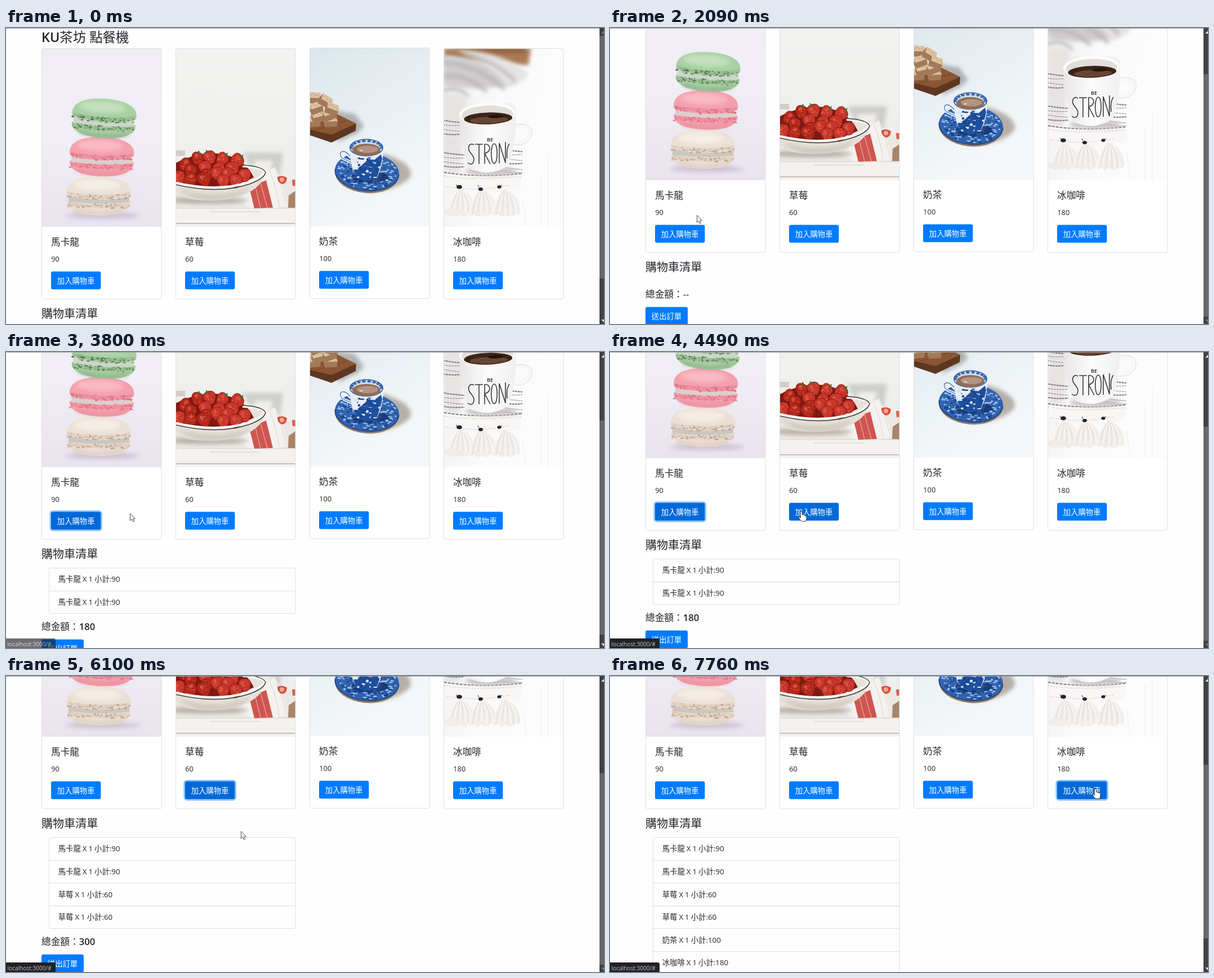
An HTML page that plays this animation: 1062 px wide and 527 px high, repeating every 8 s.

```html
<!DOCTYPE html>
<html lang="zh-Hant">
<head>
<meta charset="utf-8">
<title>點餐機</title>
<style>
html, body { margin: 0; width: 100%; height: 100%; overflow: hidden; background: #fefefe; }
svg { display: block; }
text { font: 13.37px "Open Sans", "Noto Sans CJK TC", "Noto Sans CJK JP", sans-serif; fill: #212529; white-space: pre; }
.h3 { font-size: 23.4px; }
.h4 { font-size: 20.06px; }
.h5 { font-size: 16.7px; }
.num { font-size: 12.8px; }
.row { word-spacing: -.5px; }
.b { font-weight: 600; }
.btn text { fill: #fff; }
.btn rect { fill: #007bff; }
.btn .ring { fill: none; stroke: #268fff; stroke-opacity: .5; stroke-width: 2.7; display: none; }
.btn.dark .face { fill: #0069d9; }
.btn.focus .ring { display: inline; }
.line { fill: none; stroke: #dfdfdf; }
.soft { filter: url(#soft); }
</style>
</head>
<body>
<svg id="stage" width="1062" height="527" viewBox="0 0 1062 527"></svg>
<script>
const LOOP = 8000, VIEW = 527, ROW = 40.6, EMPTY_MAX = 83;
const goods = [
  { name: '馬卡龍', price: 90, x: 63, dy: 0, art: macarons },
  { name: '草莓', price: 60, x: 301, dy: 0, art: berries },
  { name: '奶茶', price: 100, x: 539, dy: -1, art: tea },
  { name: '冰咖啡', price: 180, x: 777, dy: 0, art: coffee }
];

// Runs of screen updates: first, last, count
const runs = [
  [450, 1200, 12], [1400, 1610, 4], [1810, 2580, 12], [2630, 2630, 1], [3120, 3120, 1],
  [3310, 3870, 9], [3940, 4550, 10], [4880, 5430, 8], [5970, 6100, 3], [6180, 6740, 9],
  [6870, 7620, 11], [7690, 7760, 2]
];
const clicks = [[2630, 0], [3120, 0], [4880, 1], [5190, 1], [6740, 2], [7690, 3]];
const scrollKeys = [
  [1330, 0], [1400, 1], [1470, 28], [1540, 68], [1610, 83], [3590, 83], [3660, 86], [3730, 114],
  [3800, 149], [3870, 165], [5900, 165], [5970, 172], [6040, 212], [6100, 246]
];
const pointerKeys = [
  [380, 1080, 560], [450, 1024, 512], [700, 640, 230], [950, 260, 84], [1060, 176, 92], [1200, 247, 107],
  [1740, 247, 107], [1810, 244, 125], [2090, 154, 333], [2300, 130, 358], [2580, 134, 362],
  [3240, 134, 362], [3590, 172, 328], [3800, 220, 287], [3870, 234, 287], [4200, 300, 290], [4550, 349, 282],
  [5900, 349, 282], [6100, 417, 276], [6180, 448, 262], [6600, 590, 212], [6740, 602, 204],
  [6800, 602, 204], [7400, 826, 205], [7620, 862, 201]
];
const statusKeys = [
  [2230, 0], [2370, 1], [3660, 1], [3800, .65], [3940, 0], [4330, 0], [4400, 1],
  [6870, 1], [7020, .6], [7170, 0], [7320, 0], [7400, 1]
];

let seed = 7;
const rnd = (a, b) => {
  seed = (seed * 16807) % 2147483647;
  return +(a + (b - a) * seed / 2147483647).toFixed(1);
};
const many = (n, f) => Array.from({ length: n }, (_, i) => f(i)).join('');
const path = (d, fill, more = '') => `<path d="${d}" fill="${fill}" ${more}/>`;
const stroke = (d, color, w = 1, more = '') => path(d, 'none', `stroke="${color}" stroke-width="${w}" ${more}`);
const oval = (x, y, rx, ry, fill, more = '') => `<ellipse cx="${x}" cy="${y}" rx="${rx}" ry="${ry}" fill="${fill}" ${more}/>`;
const box = (x, y, w, h, fill, more = '') => `<rect x="${x}" y="${y}" width="${w}" height="${h}" fill="${fill}" ${more}/>`;
const label = (x, y, s, cls = '') => `<text x="${x}" y="${y}" class="${cls}">${s}</text>`;
const grad = (id, stops, x2, y2) => `<linearGradient id="${id}" x2="${x2}" y2="${y2}">` +
  stops.map((c, i) => `<stop offset="${i / (stops.length - 1)}" stop-color="${c}"/>`).join('') + '</linearGradient>';

function macaron(x, y, turn, [light, main, frill, spot, cream]) {
  const crumbs = (top, lift) => many(75, () => {
    const px = rnd(-56, 56);
    return oval(px, (top - px * px / 700 * lift + rnd(0, 9)).toFixed(1), rnd(.8, 3), rnd(.6, 1.6), rnd(0, 1) < .5 ? frill : spot, 'opacity=".8"');
  });
  return `<g transform="translate(${x} ${y}) rotate(${turn})">` +
    path('M-56 9Q0 15 57 8C59 25 38 35 0 35S-59 25-56 9', main) +
    stroke('M-44 26Q0 38 44 25', spot, 5, 'class="soft" opacity=".35"') +
    path('M-54 1Q0 8 54 0L54 10Q0 17-54 11z', cream) +
    path('M-57-3C-60-24-38-35 0-35S60-24 57-4Q52 5 0 7Q-52 5-57-3', main) +
    oval(-4, -20, 42, 10, light, 'class="soft"') +
    stroke('M-55-4Q0 7 55-5M-54 15Q0 22 54 14', frill, 6, 'opacity=".45"') +
    crumbs(-2, .7) + crumbs(13, .2) + '</g>';
}
function macarons() {
  return box(0, 0, 212, 318, 'url(#lilac)') +
    oval(108, 298, 66, 6, '#cfc5d6', 'class="soft"') +
    macaron(101, 263, 1, ['#f5eee7', '#ebe0d6', '#d8c3b0', '#b99f89', '#cbc7c0']) +
    macaron(106, 193, 2, ['#fabac4', '#f3a0ad', '#e98092', '#d66d7d', '#dccfcb']) +
    macaron(110, 125, 4, ['#c4e1be', '#a9d0a4', '#86ad7f', '#4f6747', '#cdd6c9']);
}

function berry(x, y) {
  const r = rnd(12, 14);
  return `<g transform="translate(${x} ${y}) rotate(${rnd(-60, 60)})">` +
    path(`M0 ${r}C${-r * .9} ${r * .7} ${-r * 1.4} ${-r} 0 ${-r * .9}S${r * .9} ${r * .7} 0 ${r}`, rnd(0, 1) < .5 ? '#b5271b' : '#c8352a', 'stroke="#7d150f" stroke-width=".8"') +
    oval(-3, -4, 3, 4, '#e2604c', 'opacity=".6"') +
    many(8, () => oval(rnd(-7, 7), rnd(-6, 8), .6, .8, '#e39a78')) +
    (y < 205 ? path(`M-6 ${-r * .8}l4-1 1-4 3 4 5 1-5 2z`, '#55632f') : '') + '</g>';
}
function berries() {
  const spots = [38, 196, 60, 194, 82, 197, 108, 200, 16, 207, 26, 218, 52, 212, 77, 214, 100, 214, 5, 230,
    122, 226, 55, 226, 73, 223, 92, 224, 25, 233, 84, 236, 50, 233, 106, 236];
  return box(0, 0, 212, 318, 'url(#wall)') +
    path('M118 186h72l-6 44h-18l6-30h-34v20z', '#cdcdcc', 'class="soft"') +
    path('M0 182h16v10H0z', '#d3cdc8') +
    box(0, 236, 212, 82, '#ebe7e3') + box(0, 284, 212, 34, '#f4f2f0') +
    stroke('M0 285h212M60 291h90', '#d2cbc5', 1.2) + stroke('M0 312h212', '#b9aea5', 1.4) +
    path('M200 262l12-8v30h-13z', '#a98469') +
    path('M94 264L176 211Q190 240 198 280Q170 288 132 284z', '#f4f2f0') +
    path('M130 248L160 235L172 284L139 285z', '#cf5550') +
    stroke('M140 244L150 284M150 240L162 284', '#e8a19b', 1.3) +
    stroke('M176 213Q188 245 196 279M166 218Q180 250 183 283', '#dad5d1') +
    oval(56, 271, 72, 6, '#94877d', 'class="soft" opacity=".6"') +
    path('M-14 226Q70 232 112 208Q150 208 158 222C154 250 116 271 62 271S4 260-14 240z', '#e6e1da') +
    path('M4 250Q70 272 132 248C116 266 90 271 62 271S20 264 4 250', '#cfc8c0', 'class="soft"') +
    path('M0 204Q40 184 80 188Q122 196 138 230Q100 250 50 246L0 240z', '#7d1a13') +
    many(spots.length / 2, i => berry(spots[i * 2], spots[i * 2 + 1])) +
    stroke('M-12 237Q70 258 128 239Q154 230 157 220Q152 212 118 210', '#fbfaf7', 4) +
    stroke('M-12 240Q70 262 130 242Q157 232 159 221Q154 210 118 208', '#403a38', 1.4) +
    path('M180 229Q190 225 197 231Q196 242 188 242Q179 238 180 229', '#d9503f') +
    oval(188, 234, 4, 4, '#f0a892') + path('M206 234h6v11h-5z', '#d9604f');
}

function biscuit(x, y, turn) {
  return `<g transform="translate(${x} ${y}) rotate(${turn})">` + path('M-12-6L8-10 13-1 13 9-8 13-12 4z', '#a27a58') +
    path('M-12-6L8-10 13-1-8 3z', '#dec3a2') + many(5, i => oval(-7 + i * 4, -3 - (i % 2) * 2, .8, .8, '#a07a58')) + '</g>';
}
function tea() {
  const blobs = (n, x, y, rx, ry) => many(n, () => {
    const a = rnd(0, 6.28), k = Math.sqrt(rnd(.1, .95));
    return oval((x + rx * k * Math.cos(a)).toFixed(1), (y + ry * k * Math.sin(a)).toFixed(1), rnd(1, 4), rnd(.6, 1.8), rnd(0, 1) < .6 ? '#a3bfe4' : '#163f87');
  });
  return box(0, 0, 212, 318, 'url(#sky)') +
    path('M44 112L80 118 96 140 84 152 50 168z', '#8d8885', 'class="soft" opacity=".6"') +
    path('M128 188Q186 206 178 230Q158 254 104 256z', '#7b6a5c', 'class="soft" opacity=".5"') +
    path('M0 134L43 118 82 136 81 148 38 169 0 156z', '#5d3721') +
    path('M0 132L43 116 82 135 38 155 0 146z', '#8a5634') +
    stroke('M0 139L48 126M8 147L65 130', '#6f4327') +
    biscuit(6, 130, 4) + biscuit(14, 122, -3) + biscuit(36, 130, 8) + biscuit(8, 88, 12) + biscuit(10, 106, -8) +
    biscuit(34, 118, -10) + biscuit(28, 94, 42) + biscuit(39, 108, 32) +
    `<g transform="rotate(5 101 222)">` + oval(101, 224, 57, 35, '#8f7a6a') + oval(101, 221, 57, 34, '#2f63b2') +
    blobs(260, 101, 221, 54, 32) + stroke('M44 221a57 34 0 0 0 114 0', '#173a73', 1.3) + '</g>' +
    oval(106, 230, 33, 10, '#10336f', 'opacity=".75"') +
    stroke('M72 196C59 178 50 186 55 194S68 199 75 206', '#f0f3f7', 5) +
    stroke('M72 194C59 178 50 186 55 194S68 199 75 206', '#4c75b5', 1.4) +
    path('M70 177C71 200 74 215 82 230Q98 242 118 232C127 216 130 200 130 178z', '#e8eef5') +
    path('M98 204q8-10 16-4l12-10 2 8q-4 20-11 36-20 7-34-2l-6-14 10-5z', '#1f4f9f') +
    many(42, () => oval(rnd(77, 123), rnd(196, 231), rnd(1, 4), rnd(.8, 2.4), rnd(0, 1) < .55 ? '#1a4489' : '#dbe6f3')) +
    oval(100, 178, 30, 15.5, '#24549f') + oval(100, 178, 28.5, 14, '#d3dce6') +
    many(18, i => oval((100 + 27 * Math.cos(i * .35)).toFixed(1), (178 - 12 * Math.abs(Math.sin(i * .35))).toFixed(1), 3, 2, '#3a69b0')) +
    oval(100, 182, 25, 11, '#8f6d5a') + oval(102, 181, 19, 6.5, '#b39482') + oval(91, 183, 3, 1.5, '#e3cdbf');
}

function coffee() {
  const stripe = (x, y, n, dx) => many(n, i => stroke(`M${x} ${y + i * 8}q${dx / 2} 3 ${dx} ${i % 2 ? 1 : 4}`, '#85828a', i % 3 ? 1 : 2.2, 'stroke-dasharray="4 1"'));
  const tassel = x => path(`M${x} 250q-16 12-20 38q-4 16 8 7q5 10 12 1q10 9 16-2q13 7 11-8q-2-24-27-36`, '#f1eeea') +
    many(9, i => stroke(`M${x} 250q${-18 + i * 5} 18 ${-20 + i * 5} ${rnd(38, 49)}`, i % 2 ? '#e3ddd7' : '#fbfaf8', 1.3));
  return box(0, 0, 212, 318, 'url(#linen)') +
    path('M0 0H154L150 30Q80 28 0 14z', '#a97a56', 'class="soft"') + box(20, 0, 125, 8, '#8f5c36', 'class="soft"') +
    path('M0 14Q70 14 130 62Q70 78 0 66z', '#cfcdcc', 'class="soft"') +
    path('M20 2Q104 6 150 44Q140 66 110 66Q80 22 20 4', '#e6e4e3', 'class="soft"') +
    stroke('M-4 26Q60 28 108 74M-4 50Q40 44 76 78M-4 78Q20 64 44 86M40 12Q90 22 126 58', '#b3b1b2', 5, 'class="soft"') +
    path('M0 80L40 84 28 222H0z', '#e6e4e3', 'class="soft"') + stripe(-2, 128, 4, 30) + stripe(0, 186, 4, 36) + stripe(106, 180, 6, 33) +
    stroke('M172 225v93M185 190v128M140 270l6 48', '#eeecea') +
    path('M0 222Q70 234 140 224L136 250Q70 262 0 246z', '#f8f7f6') +
    stroke('M0 221Q60 231 138 223', '#77747a', 1.8, 'stroke-dasharray="5 2"') +
    stroke('M0 227Q60 237 138 228M4 246Q60 256 116 244', '#b5b1af', 1, 'stroke-dasharray="2 3"') +
    tassel(28) + tassel(66) + tassel(108) + oval(16, 292, 17, 7, '#f0ece8') +
    oval(27, 247, 5, 3.6, '#25232a') + oval(65, 251, 4, 3, '#25232a') + oval(98, 247, 3.6, 2.8, '#25232a') +
    stroke('M21 243l5 4M62 248l-2-4M103 244l-4 2', '#25232a') +
    oval(84, 219, 46, 7, '#c3c0be', 'class="soft"') +
    stroke('M124 140C146 134 158 144 150 157S130 166 121 169', '#f8f8f8', 7) +
    stroke('M124 137C150 130 163 144 153 160S130 170 120 173', '#dddbda', 1) +
    path('M27 115C28 92 56 97 82 97S128 94 128 112C128 150 124 186 114 209Q82 231 44 214C34 185 30 150 27 115', 'url(#mug)') +
    `<g transform="rotate(-2 77 117)">` + oval(77, 117, 50, 20, '#fcfcfc') + oval(77, 119, 46, 17, '#e2deda') +
    oval(78, 125, 43, 10.5, '#3a231a') + oval(79, 128, 34, 6, '#684533') + oval(92, 122, 14, 3, '#23130d') + '</g>' +
    `<text x="76" y="166" style="font-size:9px" class="b">BE</text>` +
    stroke('M53 172c-6-4-11 2-9 9s10 10 9 18-6 9-11 5M55 171h14M62 171v35M72 206v-35c11-2 13 14 0 16l10 19M89 170c-7 0-7 35 0 35s7-35 0-35M98 205v-36l11 35v-37M116 170q-6 8-4 26', '#3c3a3b', 1.6);
}

function button(x, y, w, s, id = '') {
  const h = 31.7;
  return `<g class="btn" ${id && `id="${id}"`}><rect class="ring" x="${x - 1.3}" y="${y - 1.3}" width="${w + 2.6}" height="${h + 2.6}" rx="4.5"/>` +
    `<rect class="face" x="${x}" y="${y}" width="${w}" height="${h}" rx="3.3"/>` + label(x + 10.8, y + 21, s) + '</g>';
}
function card(g, i) {
  return `<g transform="translate(${g.x} ${g.dy})">` +
    box(.5, 36.5, 212.5, 446, '#fff', 'rx="3.3"') +
    `<svg x="1" y="36" width="212" height="318">${g.art()}</svg>` +
    `<rect class="line" x=".5" y="36.5" width="212.5" height="446" rx="3.3"/>` +
    label(17, 387.3, g.name, 'h5') + label(17.3, 416.3, g.price, 'num') + button(17, 433.6, 88.4, '加入購物車', 'buy' + i) + '</g>';
}
const row = (y, i) => `<g id="row${i}">` + label(92.7, y + 25.4, '', 'row') + (i ? stroke(`M76 ${Math.round(y) + .5}H514`, '#dfdfdf') : '') + '</g>';

const stage = document.getElementById('stage');
stage.innerHTML = '<defs><filter id="soft" x="-30%" y="-60%" width="160%" height="220%"><feGaussianBlur stdDeviation="3.5"/></filter>' +
  grad('lilac', ['#f0eef4', '#f1eef5', '#e9e3ee'], 0, 1) + grad('wall', ['#f2f2f1', '#eeedeb'], 0, 1) +
  grad('sky', ['#dbe6ec', '#e8eff3', '#f5f8f9'], .4, 1) + grad('linen', ['#f0eeed', '#fbfafa', '#fcfcfc'], 1, .3) +
  grad('mug', ['#e8e6e5', '#fcfcfc', '#f0efef'], 1, 0) + '</defs>' +
  box(0, 0, 1062, 527, '#fefefe') + '<g id="page">' +
  '<text x="63" y="24.6" class="h3"><tspan class="b">KU</tspan>茶坊 點餐機</text>' +
  goods.map(card).join('') + label(63, 515.6, '購物車清單', 'h4') +
  '<rect id="list" class="line" x="76.5" y="533.5" width="437.5" rx="3.3"/>' +
  clicks.map((c, i) => row(533 + ROW * i, i)).join('') +
  '<g id="foot"><text x="63" y="563.4" class="h5">總金額：<tspan id="sum"></tspan></text>' + button(63, 579.8, 75, '送出訂單') + '</g></g>' +
  box(0, 0, 1054, 1, '#9b9b9b') + box(1054, 0, 8, 527, '#424242') +
  '<rect id="thumb" x="1054" width="8" fill="#686868"/>' +
  '<path id="up" d="M1057 10l5-5v5z"/><path id="down" d="M1057 519h5v5z"/>' +
  '<g id="status"><path d="M0 510h85q3 0 3 3v14H0z" fill="#202124"/>' +
  '<text x="2.5" y="523.5" style="font-size:10.1px;fill:#c4c7cb">localhost:3000/#</text></g>' +
  '<path id="arrow" d="M.5.5V13.2L3.4 10.6 5.4 15.2 7.6 14.2 5.6 9.8H9.4z" fill="#fff" stroke="#222" stroke-width=".8"/>' +
  '<path id="hand" d="M-1.6 1.4Q-1.6 0 0 0T1.6 1.4V6.2L2.2 5.4Q4 5 4.4 6.6Q6.4 6 6.8 7.6Q8.8 7.2 9 9V13L7.4 17.5H0L-5 11Q-5.2 9.2-3.4 9.6L-1.6 11.2z" fill="#fff" stroke="#222" stroke-width=".8"/>';

const $ = id => document.getElementById(id);
const show = (node, on) => node.style.display = on ? '' : 'none';

function lerp(keys, t, col = 1) {
  const i = keys.findIndex(k => k[0] > t);
  if (i < 0) return keys[keys.length - 1][col];
  if (!i) return keys[0][col];
  const a = keys[i - 1], b = keys[i];
  return a[col] + (b[col] - a[col]) * (t - a[0]) / (b[0] - a[0]);
}
function held(t) {
  const run = runs.filter(r => r[0] <= t).pop();
  if (!run) return 0;
  const [from, to, n] = run;
  if (t >= to) return to;
  const step = (to - from) / (n - 1);
  return from + Math.floor((t - from) / step + .01) * step;
}

function draw(time) {
  const t = held(time);
  const scroll = Math.round(lerp(scrollKeys, t));
  const x = Math.round(lerp(pointerKeys, t, 1)), y = Math.round(lerp(pointerKeys, t, 2));
  const cart = clicks.filter(c => c[0] <= t + 1).map(c => c[1]);
  const n = cart.length, grow = ROW * n;
  $('page').setAttribute('transform', `translate(0 ${-scroll})`);

  let over = false;
  goods.forEach((g, i) => {
    const dx = x - g.x - 17, dy = y + scroll - 434 - g.dy;
    const hover = dx >= 0 && dx < 88 && dy >= 0 && dy < 31;
    const focus = n > 0 && cart[n - 1] === i;
    over = over || hover;
    $('buy' + i).setAttribute('class', 'btn' + (hover || focus ? ' dark' : '') + (focus ? ' focus' : ''));
  });

  show($('list'), n);
  $('list').setAttribute('height', Math.round(grow));
  clicks.forEach((c, i) => {
    const g = goods[c[1]];
    show($('row' + i), i < n);
    $('row' + i).firstChild.textContent = `${g.name} X 1 小計:${g.price}`;
  });
  $('foot').setAttribute('transform', `translate(0 ${Math.round(grow)})`);
  $('sum').textContent = n ? cart.reduce((a, i) => a + goods[i].price, 0) : '--';
  $('sum').setAttribute('class', n ? 'b' : '');

  const max = EMPTY_MAX + grow, unit = 500 / (VIEW + max);
  $('thumb').setAttribute('y', Math.round(14 + scroll * unit));
  $('thumb').setAttribute('height', Math.round(VIEW * unit));
  $('up').setAttribute('fill', scroll > 1 ? '#e4e4e4' : '#777');
  $('down').setAttribute('fill', scroll < max - 1 ? '#e4e4e4' : '#777');
  $('status').setAttribute('opacity', lerp(statusKeys, t));
  for (const id of ['arrow', 'hand']) {
    show($(id), (id === 'hand') === over);
    $(id).setAttribute('transform', `translate(${x} ${y})`);
  }
}

const start = performance.now();
function tick() {
  draw((performance.now() - start) % LOOP);
  requestAnimationFrame(tick);
}
draw(0);
requestAnimationFrame(tick);
</script>
</body>
</html>
```
